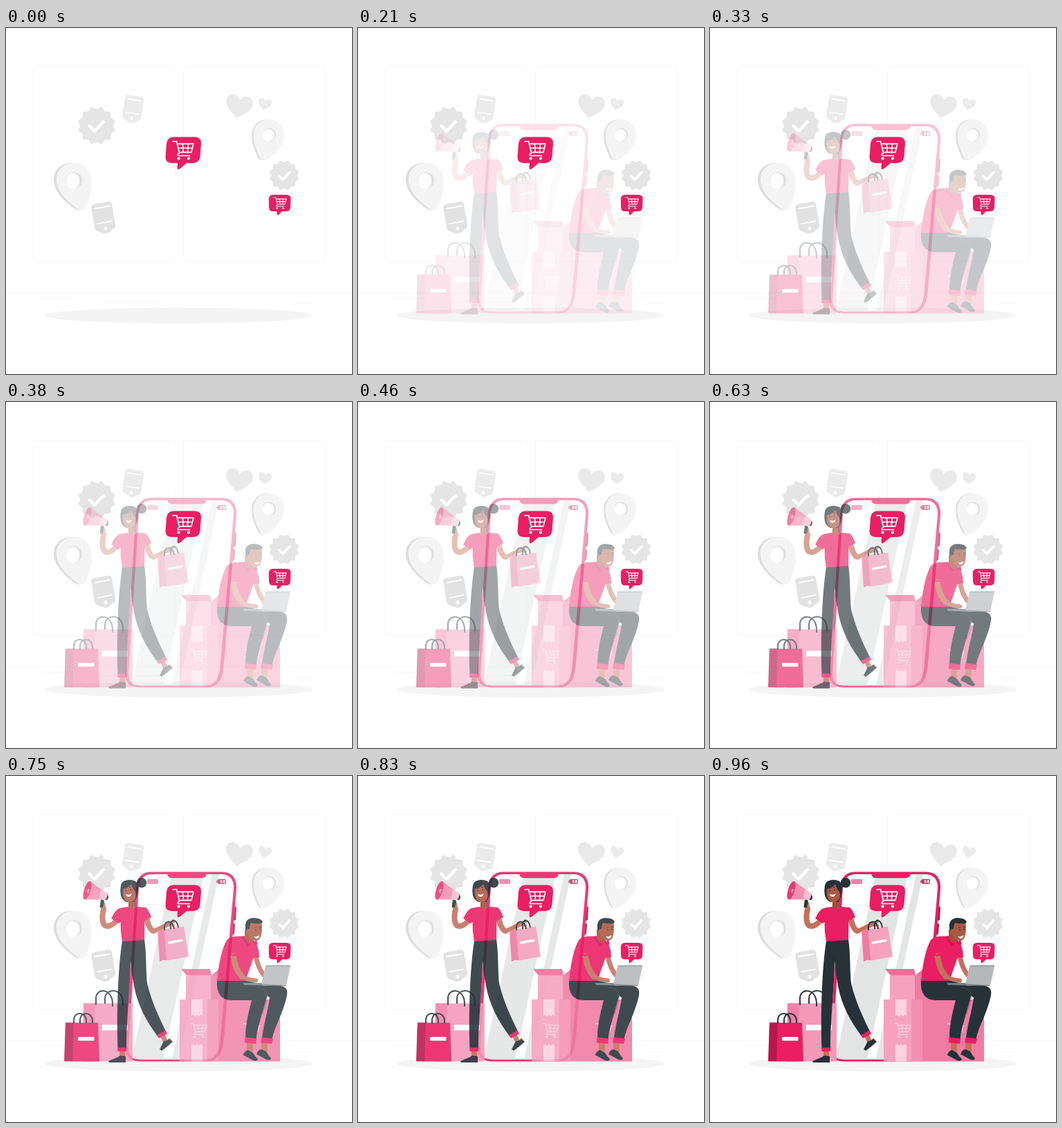
Animation, 500 px wide and 500 px high, one loop 1 s. Source, as an HTML page:

```html
<!DOCTYPE html>
<html lang="en">
<head>
<meta charset="utf-8">
<title>Online shopping</title>
<style>
html, body { margin: 0; width: 100%; height: 100%; overflow: hidden; background: #fff; }
svg { display: block; width: 100%; height: 100%; }
.fade { animation: fade 1s -4ms infinite both; }
/* 24 pictures a second, slow at first, then nearly even */
@keyframes fade {
  0% { opacity: 0; animation-timing-function: step-end; }
  12.5% { opacity: .04; animation-timing-function: steps(5); }
  33.3333% { opacity: .27; animation-timing-function: steps(5); }
  54.1667% { opacity: .54; animation-timing-function: steps(5); }
  75% { opacity: .81; animation-timing-function: steps(5); }
  95.8333%, 100% { opacity: 1; }
}
.pink { fill: #e91e63; }
.mid { fill: #f07ba3; }
.rose { fill: #f48fb1; }
.pale { fill: #f6a2bf; }
.dark { fill: #263238; }
.skin { fill: #ad5944; }
.arm { fill: none; stroke: #c4705b; stroke-linecap: round; stroke-linejoin: round; }
.grip { fill: none; stroke: #263238; stroke-width: 1.9; }
.white { fill: #fff; }
.line { fill: none; stroke: #fff; stroke-linecap: round; stroke-linejoin: round; }
</style>
</head>
<body>
<svg viewBox="0 0 500 500">
  <defs>
    <g id="cart">
      <path d="M0 0H5.6L9.6 17Q6 18 7.500 20.500H24.500M6.500 3.400H30L26.800 15.600H9.300M7.800 9.500H28.300M14.300 3.400L15.300 15.600M22.300 3.400L21.300 15.600" fill="none" stroke="currentColor" stroke-width="1.7" stroke-linecap="round" stroke-linejoin="round"/>
      <circle cx="8.500" cy="24.500" r="2.1" fill="currentColor"/>
      <circle cx="22.800" cy="24.500" r="2.1" fill="currentColor"/>
    </g>
    <path id="heart" d="M0 18C-7 11-20 5-20-6C-20-18-5-20 0-9C5-20 20-18 20-6C20 5 7 11 0 18Z"/>
    <g id="tag">
      <path d="M-9-20H9Q14-20 14-15V14Q14 17 11 18.5L3 23Q0 24.5-3 23L-11 18.5Q-14 17-14 14V-15Q-14-20-9-20Z"/>
      <path class="line" stroke-width="1.9" d="M-9.5-13.5H10.5M-9.5 8H9.5"/>
      <circle class="white" cy="16.5" r="2.5"/>
    </g>
    <path id="pinA" d="M98 195C113 194 124 207 124 221C124 238 119 250 116 258C114 264 108 265 103 261C92 253 73 238 73 219C73 205 84 195 98 195Z"/>
    <path id="pinB" d="M380 132C393 132 402 143 402 155C402 170 389 181 381 188C375 192 368 192 366 186C362 177 357.500 167 357.500 154C358 141 368 132 380 132Z"/>
  </defs>

  <!-- room -->
  <g fill="#fff" stroke="#f9f9f9">
    <rect x="39.500" y="55.500" width="205" height="282" rx="5"/>
    <rect x="256.500" y="55.500" width="204" height="282" rx="5"/>
    <path d="M0 382.500H500M50 390.500H97M104 390.500H112M134 395.500H225M399 389.500H417M417 398.500H449"/>
  </g>
  <ellipse cx="249.500" cy="415.500" rx="194" ry="11.500" fill="#f4f4f4"/>

  <!-- grey symbols -->
  <g fill="#e5e5e5">
    <polygon class="seal" data-at="131,141,28,23.5"/>
    <polygon class="seal" data-at="402,213,22.3,18.7"/>
    <path class="line" stroke-width="4.500" stroke-linecap="butt" d="M120.500 141.500L128 149L141 135.500"/>
    <path class="line" stroke-width="3.500" d="M394.500 214L400 219L410 208.500"/>
    <use href="#heart" transform="translate(336.500 113) rotate(10) scale(.97)" fill="#e9e9e9"/>
    <use href="#heart" transform="translate(374 110) rotate(9) scale(.49)" fill="#ebebeb"/>
    <use href="#tag" transform="translate(183.500 116) rotate(9) scale(.98 .91)" fill="#ebebeb"/>
    <use href="#tag" transform="translate(140.800 273) rotate(-10) scale(1.080 1.030)" fill="#e2e2e2"/>
    <use href="#pinA" x="-4" fill="#dedede"/>
    <use href="#pinA" fill="#f4f4f4"/>
    <ellipse cx="98" cy="220" rx="12" ry="12" fill="#e0e0e0"/>
    <ellipse cx="96.500" cy="221" rx="10" ry="11.500" class="white"/>
    <use href="#pinB" x="-2.500" fill="#dedede"/>
    <use href="#pinB" fill="#f4f4f4"/>
    <circle cx="380" cy="154.500" r="10" fill="#e0e0e0"/>
    <circle cx="379" cy="155" r="9" class="white"/>
  </g>

  <!-- phone -->
  <g class="fade">
    <path d="M330 187L333 190L332 208L328 210ZM328 212L331 214L330 228L327 230Z" fill="#b0164b"/>
    <path d="M209 138.500H312Q334 139 333 163L314.500 383Q311 412.500 291 412.500H192Q171.500 412 172.500 392L188 161Q190 139 209 138.500Z" class="pink"/>
    <path d="M210 142H310Q330 142 329 163L309.500 383Q307 409.500 289 409.500H194Q176 409 177 392L192 161Q193 143 210 142Z" class="white"/>
    <path d="M240 142H285.500L227 409.500H194Q186 409.500 182 407ZM298 142H308L250 409.500H240Z" fill="#e3e4e4"/>
    <path d="M233 141H290Q289 147.500 283 147.500H240Q234 147.500 233 141Z" class="pink"/>
    <rect x="204" y="149" width="16" height="7" rx="2" fill="#e983a8"/>
    <path d="M307 149H316Q318 149 318 151V154Q318 156 316 156H307L303.500 152.500Z" fill="#c33c6d"/>
    <path d="M310 150.500H312.500V154.500H310ZM314 150.500H316.500V154.500H314Z" class="white"/>
  </g>

  <!-- bags on the floor -->
  <g class="fade">
    <path d="M112 328.500H183V412.500H111Z" fill="#f599b9"/>
    <path d="M112 328.500H129L127 412.500H111Z" fill="#f281a7"/>
    <path d="M139 359.500H176V367.500H139Z" class="white"/>
    <path class="grip" d="M130 331V321C130 306 153 306 154 328V333M143 329V321C144 306 168 306 169 326V333"/>
    <path d="M86 356.500H133L135 412.500H85Z" class="pink"/>
    <path d="M86 356.500H98L96 412.500L90 411L84 412Z" fill="#b8174e"/>
    <rect x="104" y="377" width="23.500" height="5.500" rx=".8" class="white"/>
    <path class="grip" stroke-width="1.500" d="M98 358V353C98 340 115 340 116 353V357M107 358V353C107 340 124 340 125 353V357"/>
  </g>

  <!-- woman with megaphone and bag -->
  <g class="fade">
    <path d="M164 396H172V407H164ZM223 376L229 373L234 383L228 386Z" fill="#c4705b"/>
    <path d="M148 412L162 406L165 404L173 405L173 414H149ZM222 395L228 383Q232 384 236 379L241 384L233 391L225 397Z" class="dark"/>
    <path d="M168 238L200 236C203 255 202 280 204 300C211 328 222 350 231 369L219 376C204 356 190 332 185 303L180 266C180 300 174 350 174 393H161.500C160 350 161 290 167 245Z" class="dark"/>
    <path d="M180 266C181 280 183 295 187 309L178 259Z" fill="#172126"/>
    <path d="M161 392.500H174.500L174 398H161.500ZM218 374.500L230.500 367.500L233 372.500L221 379Z" class="pink"/>
    <path class="arm" stroke-width="8" d="M160 209Q149 220 143 216Q137 210 141 192M203 205Q207 222 213 224"/>
    <path class="arm" stroke-width="6" d="M213 224.500Q224 219 235 214M140.500 193L140.500 185"/>
    <path class="arm" stroke-width="3.500" d="M236 213L243 210M237 215L242 216"/>
    <path d="M175 189Q182 193 190 189L202 190Q206 193 210 204L200.500 209L200 237L168 239Q165 225 165.500 211L163 213L152 206Q158 193 164 191Z" class="pink"/>
    <path d="M177 179H187V189Q182 195 176.500 190Z" fill="#a14f3c"/>
    <circle cx="196" cy="154.300" r="7.200" class="dark"/>
    <path d="M170 152Q178 148 187 152Q192 156 191 165Q190 176 185 182H174Q164 178 165.500 162Q166 154 170 152Z" class="dark"/>
    <path d="M169 163Q177 162 181 156Q184 165 187 167Q190 177 183 181Q175 184 171 178Q168 172 169 163Z" class="skin"/>
    <path d="M173 170.500Q177 173 181.500 170Q180.500 175 176.500 174.500Q174 174 173 170.500Z" class="white"/>
    <path d="M171 162.500L174 161.500M178 160.500L181 161" fill="none" stroke="#263238"/>
    <circle cx="173" cy="165.500" r=".9" class="dark"/>
    <circle cx="180" cy="164.500" r=".9" class="dark"/>

    <path d="M137 178L142 180L140 190L135.500 190Z" class="dark"/>
    <path d="M142 170Q149 171 148 176Q147 181 142 178Z" class="dark"/>
    <path d="M122 152L146 170Q147 175 143 178.500L113 178.500Z" class="rose"/>
    <path d="M137 164L146 170Q147 175 143 178.500H134Z" fill="#f8bbd0"/>
    <ellipse cx="117.500" cy="165.300" rx="4.800" ry="13.700" transform="rotate(17 117.500 165.300)" fill="#e63a75"/>
    <ellipse cx="119" cy="166" rx="1.800" ry="3" transform="rotate(17 119 166)" class="rose"/>

    <path d="M228 221L257 217.500L264 261L231 267Z" class="pale"/>
    <path d="M219 224L228.500 221L232 266L226 266L222 268.500Z" class="mid"/>
    <path class="line" stroke-width="3.500" stroke-linecap="butt" d="M235.500 241L254 237.500"/>
    <path class="grip" stroke-width="1.400" d="M229 223V217C230 208 241 208 243 221M238 221C235 206 247 204 249 219"/>
  </g>

  <!-- man on boxes -->
  <g class="fade">
    <path d="M296 288H330V323H296Z" class="mid"/>
    <path d="M260 288H296V323H260Z" class="pale"/>
    <path d="M253 279H295L297 288H261ZM297 288L308 279H330V288Z" fill="#ee6d99"/>
    <path d="M251 323H307V412.500H251Z" class="pale"/>
    <path d="M291 323H307V412.500H291Z" fill="#f38fb1"/>
    <path d="M307 323H396V412.500H307Z" class="mid"/>
    <path d="M268 323H284V347L281.300 345L278.600 348L276 345L273.400 348L270.700 345L268 347ZM268 389L270.700 387L273.400 390L276 387L278.600 390L281.300 387L284 389V412.500H268Z" fill="#fbd0df"/>
    <g color="#fbd0df">
      <use href="#cart" transform="translate(266.500 357.500) scale(.78)"/>
      <use href="#cart" transform="translate(343 358) scale(.78)"/>
    </g>

    <path class="arm" stroke-width="7" d="M361 260Q364 277 372 287"/>
    <path d="M348 384H357V398H348ZM369 384H378V398H369Z" fill="#c4705b"/>
    <path d="M342.500 403Q346 396 350 396L357 400Q360 406 364 409Q363 413 357 411ZM362 402Q365 395 369 395L376 398Q380 405 383 408Q382 411.500 377 410Z" class="dark"/>
    <path d="M340 296L372 303H397Q408 305 406 317C401 342 388 362 384.500 380L370 378C373 355 379 338 381 320Z" class="dark"/>
    <path d="M305 295H345L368 301Q379 304 377 319C372 338 364 360 361.500 380L346 378C346 358 351 340 355 324H325Q303 323 305 295Z" class="dark"/>
    <path d="M362 306Q377 305 377.500 319Q375 332 371 343" fill="none" stroke="#46545a" stroke-width=".6"/>
    <path d="M345.500 377.500L362 379.500L361 387L345 385.500ZM369.500 377.500L386 379.500L384 387L368 385.500Z" class="pink"/>
    <path d="M346 231L339 231.500Q325 231 319 237C311 251 307 275 305 296H346L357.500 263L366 262Q366 246 358 237Z" class="pink"/>
    <path class="arm" stroke-width="8.500" d="M328.500 260Q331 279 341 290"/>
    <path class="arm" stroke-width="6" d="M341 290.500L354 294.500L361 295.500"/>
    <path d="M320 256Q328 260 336 255L336 259Q328 261 321 259Z" class="pink"/>
    <path d="M345 222H358V237Q352 243 345 234Z" fill="#a14f3c"/>
    <path d="M343 231Q347 241 354 242L349 246L341 234ZM355 242L362 237L364 244Z" fill="#c91a55"/>
    <path d="M349 211L369.500 211Q371 228 367 235Q363 240 357 237Q350 233 348 223Z" class="skin"/>
    <path d="M346 221Q344 206 357 205Q369 205 371 211L369 213Q358 214 353.500 212Q353 219 349.500 225Q347 225 346 221Z" class="dark"/>
    <ellipse cx="350" cy="224.500" rx="2.500" ry="3.500" class="skin"/>
    <path d="M358.500 231.500Q362 233 366.500 230Q366 235 361.500 235Q359 234.500 358.500 231.500Z" class="white"/>
    <circle cx="361" cy="222.500" r=".9" class="dark"/>
    <circle cx="367" cy="221.500" r=".9" class="dark"/>
    <path d="M359 219.500L362 218.500M366 218L369 218.500" fill="none" stroke="#263238"/>
    <path d="M342 299H369L405 301L404 303.500L344 302Z" fill="#747d82"/>
    <path d="M377 273.500H410Q411.500 273.500 411 275L405 302.500L369 300.500L375 275Q375.500 273.500 377 273.500Z" fill="#b4b8ba"/>
    <path d="M377 273.500H411L410.500 275.500H375Z" fill="#9ba1a4"/>
  </g>

  <!-- speech bubbles -->
  <g color="#fff">
    <path class="pink" d="M242 157.500H273Q282.500 158 282 167L280.500 186Q279.500 195 270 195.300H261L251 203.500Q248 205.500 247.500 202.500L248 195.300H240Q230 195 230.500 186L232 167Q233 158 242 157.500Z"/>
    <use href="#cart" transform="translate(241 164)"/>
    <path class="pink" d="M386 241H405.500Q411.500 241 411.500 247L411 259Q410.500 265 405 265H399L394 269.800Q391.500 271 391.500 268.500V265H386Q380 265 380 259L379.700 247Q380 241 386 241Z"/>
    <use href="#cart" transform="translate(386.500 245) scale(.62)"/>
  </g>
</svg>
<script>
// jagged round badges: centre, outer and inner radius
for (const seal of document.querySelectorAll('.seal')) {
  const [cx, cy, outer, inner] = seal.dataset.at.split(',').map(Number);
  const points = Array.from({ length: 24 }, (_, i) => {
    const angle = (i + 1) * Math.PI / 12, r = i % 2 ? inner : outer;
    return [cx + r * Math.cos(angle), cy + r * Math.sin(angle)].map(v => v.toFixed(1)).join();
  });
  seal.setAttribute('points', points.join(' '));
}
</script>
</body>
</html>
```
